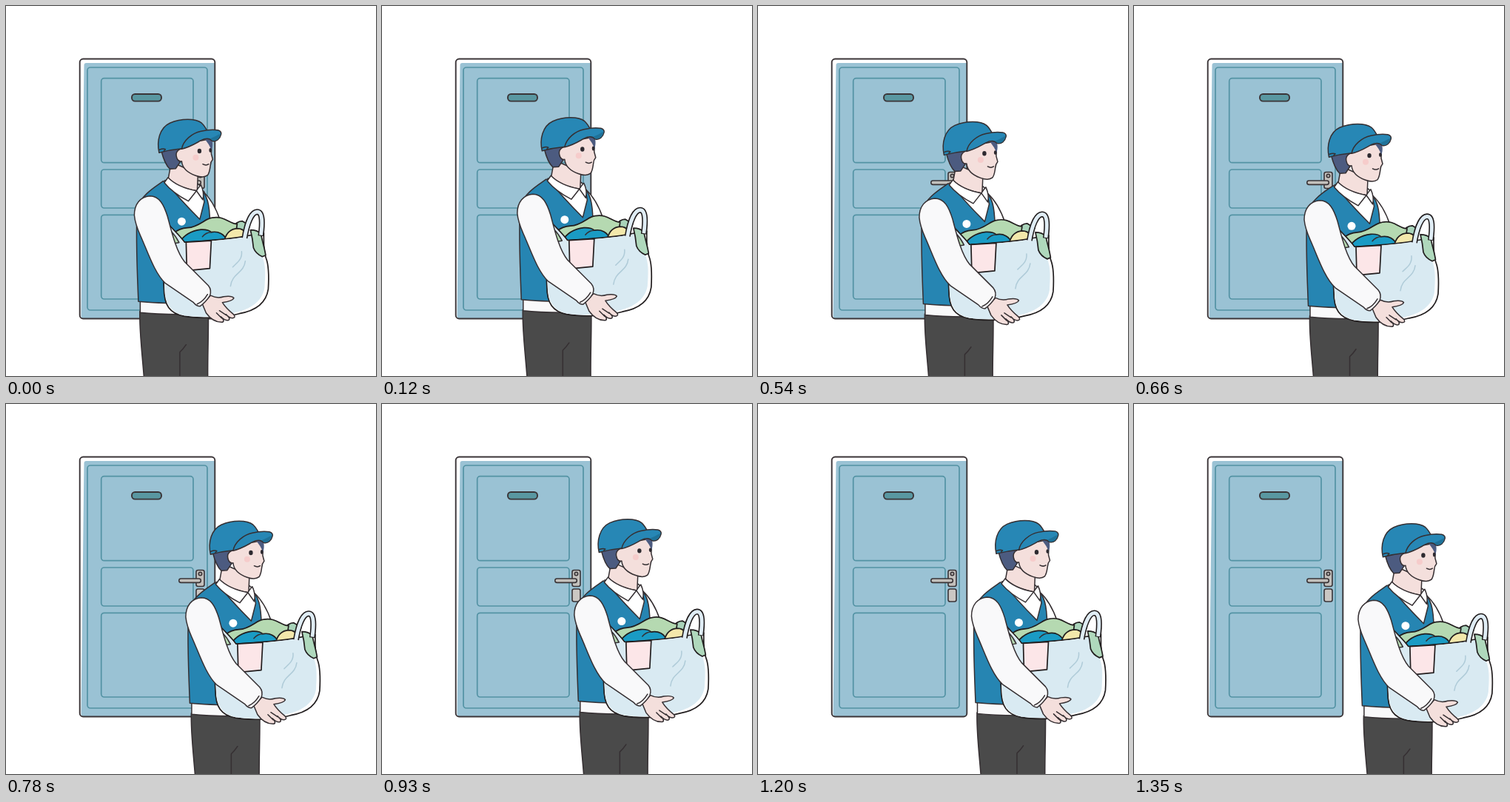
An HTML page for the animation above (1800 ms loop, 500 by 500 pixels).

```html
<!DOCTYPE html>
<html lang="en">
<head>
<meta charset="utf-8">
<title>Laundry pickup</title>
<style>
  html, body { margin: 0; width: 100%; height: 100%; overflow: hidden; background: #fff; }
  svg { display: block; width: 100%; height: 100%; }
  .ink { stroke: #352f32; stroke-width: 1.5; stroke-linejoin: round; stroke-linecap: round; }
  .bold { stroke: #211d1e; stroke-width: 1.7; stroke-linejoin: round; stroke-linecap: round; }
  .panel { fill: none; stroke: #5393a4; stroke-width: 1.7; }
  .none { fill: none; }
  .skin { fill: #f4dfdc; }
  .vest { fill: #2685b2; }
  .cap { fill: #2787b5; }
  .shirt { fill: #f9f9fa; }
  .hair { fill: #4c5b80; }
  .bag { fill: #d9eaf2; }
  .crease { fill: none; stroke: #afcbd8; stroke-width: 1.5; stroke-linecap: round; }
</style>
</head>
<body>
<svg viewBox="0 0 500 500">
  <g id="door">
    <path fill="#9ac2d4" d="M105.500 80Q105.500 77 108.500 77H282V422H104Q101.500 422 101.500 419Z"/>
    <rect class="panel" x="110" y="83" width="162" height="328" rx="4"/>
    <rect class="panel" x="128.7" y="97.7" width="124.3" height="114" rx="4"/>
    <rect class="panel" x="128.7" y="221" width="124.3" height="52" rx="4"/>
    <rect class="panel" x="128.7" y="282.3" width="124.3" height="113.7" rx="4"/>
    <rect x="99.7" y="71.5" width="182.6" height="351" rx="4.5" fill="none" stroke="#3a3437" stroke-width="1.9"/>
    <rect x="170" y="119" width="40" height="9.6" rx="4.4" fill="#5997a1" stroke="#3a3437" stroke-width="1.9"/>
    <g fill="#c3c0bc" stroke="#3a3437" stroke-width="1.6">
      <rect x="257" y="224.5" width="11" height="22" rx="2.5"/>
      <circle cx="262.5" cy="229.6" r="2.2"/>
      <rect x="233.8" y="236" width="29.5" height="5.4" rx="2.6"/>
      <rect x="257" y="250" width="11" height="17" rx="2.5" fill="#cbc7c3"/>
    </g>
  </g>

  <g id="courier">
    <g transform="translate(-.6 .7)">
    <!-- trousers and shirt hem -->
    <path class="ink" fill="#4a4a4a" d="M181.500 412C180.500 440 185 470 188 514H273.500C272.500 480 274.500 450 274 412Z"/>
    <path class="ink none" d="M244 457Q240 463 235.500 467V514"/>
    <path class="ink shirt" d="M182 398L182 413.500Q203 416 236 416V398Z"/>

    <!-- far sleeve, vest and collar -->
    <path class="ink" fill="#fff" d="M266 249C276 258 284 271 290 289L262 300Z"/>
    <path class="ink vest" d="M213 236C202 244 184 254 178 272C175.500 310 178 360 179.500 398.500Q200 400.500 250 402L276 320C276.500 295 277 270 271 257L265 247Z"/>
    <path class="ink" fill="#fff" d="M215 235C230 254 247 272 262.500 287.500L268.500 264L265 244L250 232Z"/>
    <path class="ink skin" d="M224 210L220 232Q234 246 259 249L260 226Z"/>
    <path class="ink" fill="#fff" d="M219.500 231Q232 244 258 249L247 263Q226 252 214.500 238Z"/>
    <path class="ink" fill="#fff" d="M258 249L266.500 261Q269 252 264 241Q261 244 258 249Z"/>
    <circle cx="238" cy="290.500" r="5.500" fill="#fff"/>

    <!-- head -->
    <path class="ink hair" d="M210.500 195C213 205 216 214 222 219.500L230 219L238 207L238 190Z"/>
    <path class="ink skin" d="M238 192C231 194 229 199 232 206Q234 210 238 209C239 220 247 225 257 228.500C264 231 270 230.500 273 228C276 224 276 219 277 214Q277 210 280 206.500L278 199Q279 189 276 179L255 183Z"/>
    <path class="hair" d="M270 178L278 177.500C280 183 280.500 188 278.500 194Q275 186 270 180Z"/>
    <circle cx="257" cy="204" r="4" fill="#f6cccb"/>
    <ellipse cx="262" cy="195.300" rx="2.700" ry="3.200" fill="#2d2a30"/>
    <ellipse cx="276.700" cy="194.300" rx="1.700" ry="2.900" fill="#2d2a30"/>
    <path class="ink none" d="M266.500 213Q271 215.500 274.500 213"/>
    <path class="ink cap" d="M207.500 197.500C204 182 208 164 222 157.500C237 151 257 151 265 157.500C269 161 271 165 273 169L238 192Q222 193.500 207.500 197.500Z"/>
    <path class="ink cap" d="M238 192.500C240 181 252 171 264 168.500Q277 165.500 287 167Q292 168.500 291.300 172.500C290 178.500 285 183.500 279 181.500Q274 176 264 181C255 186 249 190 238 192.500Z"/>
    <path fill="#1f7299" d="M276.500 178.500Q283 176 290.500 171.500C290 178 285 182.500 279.500 181Z"/>
    <path class="ink none" d="M208 193.500Q213 191.500 216 193L214 195"/>

    <!-- laundry -->
    <path class="bold" fill="#a9d3ba" d="M306 300Q312 290 320 290L330 296L326 308Z"/>
    <path class="bold" fill="#b5d9b1" d="M228 306Q234 300 246 299C262 298 270 286 279 285.500C296 282 302 294 313 294L310 314H240L233 320Z"/>
    <path class="bold" fill="#1a9bc4" d="M235 319C242 307 252 303 264 301.500Q274 301 278 305C288 303 296 308 299 316L250 325Z"/>
    <path class="ink none" d="M266 311Q271 305 278 305"/>
    <path class="bold" fill="#f3e8ab" d="M296 315Q300 301 313 300Q321 300 324 306L320 316Z"/>

    <!-- bag -->
    <path class="bold" fill="#fff" d="M221 295C227 302 235 309 242 318.500C268 317 302 314 321 311L349 306C349 318 348 330 352 340C356 350 356 365 355 382C352 402 336 411.500 316 415C294 421 262 422 241 418.500C222 414.500 214 404 214 380L212 340Z"/>
    <path class="bag" d="M222 298C228 305 235 311 241 319.500C268 318 302 315 321 312L346 307L347 338C352 350 351 364 350 380C347 399 330 409 312 413C290 419 262 421 242 417.500C224 413.500 215.500 403 215 380L213 340Z"/>
    <path class="ink" fill="#b5d9b1" d="M224 304Q230 310 234.500 319L228 320Z"/>
    <path class="crease" d="M319 331C320 342 313 346 307 352"/>
    <path class="crease" d="M324 344C322 361 306 360 304 378"/>
    <path class="bold" fill="#afd8bc" d="M331 302Q340 302 345 307C347 318 350 326 351.500 336L347 338Q338 334 335 326Q334 314 331 302Z"/>
    <g fill="none">
      <path stroke="#211d1e" stroke-width="8" d="M323 313C326 294 332 278 340 277.500C348 277.500 347 295 345 310"/>
      <path stroke="#dfecf4" stroke-width="4.800" d="M322.600 315C326 294 332 278 340 277.500C348 277.500 347 295 345 309"/>
    </g>
    <path class="bold" fill="#fce6e8" d="M244 318.500L278 316.500L276 354L245 357Z"/>

    <!-- near arm and hand -->
    <path class="ink skin" d="M266 402L277 390.500Q286 395 295 392Q306 390.500 308.500 394Q307 398 293 400Q298 408 308 416Q312 420 307 421Q302 421 298 416Q305 422 301 424Q297 425 291 419Q297 425 293 426.500C283 427 276 421 271 414Z"/>
    <path class="ink none" d="M289 411L298 417M285 414L292 421"/>
    <path class="ink shirt" d="M174 282C174 267 182 257 195 256C208 256 214 268 219 284C224.500 305 231 332 242 345L274 377Q279 383 276 391Q271 399 263 405Q258 405 254 400L216 374C201 360 192 331 182 309Q175 293 174 282Z"/>
    <path class="ink none" d="M259 402Q267 399 273 389"/>
    </g>
  </g>
</svg>
<script>
  const LOOP = 1800, STEP = 30;

  // [time, x, y] along the walk; the last pose holds until the loop restarts
  const walk = [
    [0, 0, 0], [120, 9.4, -2.5], [240, 18.6, -5], [330, 26, -4.3],
    [540, 44.5, 3.2], [680, 58.7, 6.3], [780, 69.5, 5],
    [1040, 98.9, .6], [1080, 103.4, .9], [1350, 129.5, 8.5]
  ];
  const courier = document.getElementById('courier');

  function slope(i, k) {
    const a = walk[Math.max(i - 1, 0)], b = walk[Math.min(i + 1, walk.length - 1)];
    return (b[k] - a[k]) / (b[0] - a[0]);
  }

  // Cubic Hermite between neighbouring poses
  function at(t, k) {
    const last = walk.length - 1;
    if (t >= walk[last][0]) return walk[last][k];
    let i = 0;
    while (t >= walk[i + 1][0]) i++;
    const a = walk[i], b = walk[i + 1], h = b[0] - a[0], u = (t - a[0]) / h;
    const u2 = u * u, u3 = u2 * u;
    return a[k] * (2 * u3 - 3 * u2 + 1) + b[k] * (3 * u2 - 2 * u3)
      + h * (slope(i, k) * (u3 - 2 * u2 + u) + slope(i + 1, k) * (u3 - u2));
  }

  function draw() {
    const t = Math.floor((performance.now() - start) % LOOP / STEP) * STEP;
    courier.setAttribute('transform', `translate(${at(t, 1).toFixed(2)} ${at(t, 2).toFixed(2)})`);
    requestAnimationFrame(draw);
  }

  const start = performance.now();
  draw();
</script>
</body>
</html>
```
